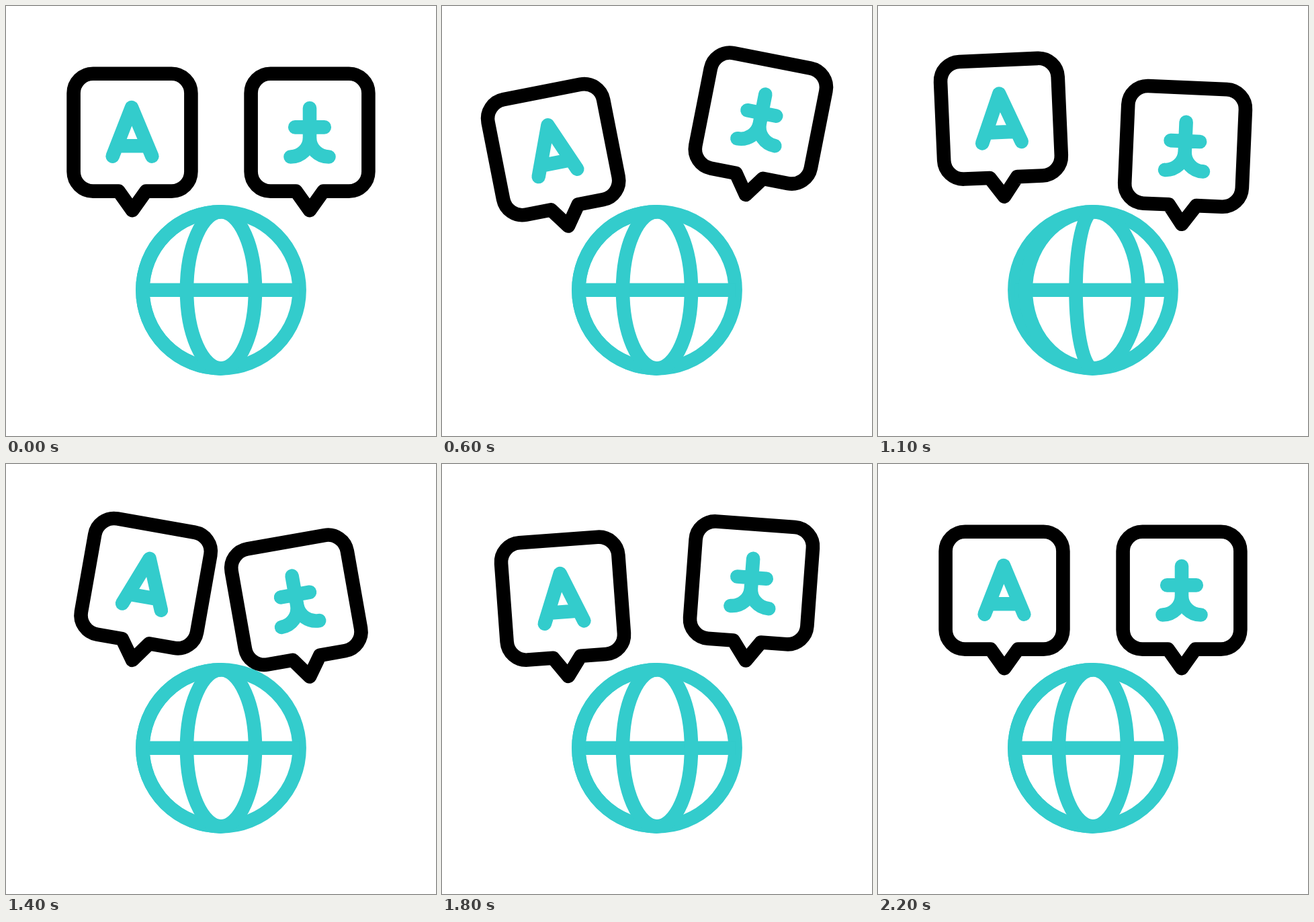
An HTML page with a canvas that plays this animation: 640 by 640 pixels, repeating every 2400 ms.

```html
<!DOCTYPE html>
<html lang="en">
<head>
<meta charset="utf-8">
<title>Translation</title>
<style>
  html, body { margin: 0; width: 100%; height: 100%; overflow: hidden; background: #fff; }
  canvas { display: block; width: 100vmin; height: 100vmin; }
</style>
</head>
<body>
<canvas id="stage" width="640" height="640"></canvas>
<script>
const ctx = document.getElementById('stage').getContext('2d');
const LOOP = 2400, STEP = 20;
const TEAL = '#33cccc', BLACK = '#000';
const LINE = 20.6;

// [time in ms, value], eased between neighbours
const LIFT = [[200, 0], [700, 26], [1200, -26], [1700, 13], [2200, 0]];
const TILT = [[200, 0], [800, -15], [1400, 10], [1800, -4.2], [2200, 0]];

const lerp = (a, b, p) => a + (b - a) * p;
const ease = p => p * p * (3 - 2 * p);

function valueAt(keys, t) {
  if (t <= keys[0][0]) return keys[0][1];
  for (let i = 1; i < keys.length; i++) {
    const [t0, a] = keys[i - 1], [t1, b] = keys[i];
    if (t < t1) return lerp(a, b, ease((t - t0) / (t1 - t0)));
  }
  return keys[keys.length - 1][1];
}

function stroke(color, build) {
  ctx.strokeStyle = color;
  ctx.beginPath();
  build();
  ctx.stroke();
}

function polyline(...pts) {
  pts.forEach(([x, y], i) => i ? ctx.lineTo(x, y) : ctx.moveTo(x, y));
}

// Bubble shapes are drawn around the tip of the tail at (0, 0).
function frame() {
  const w = 87.4, top = -203.4, bottom = -28.6, r = 29, tail = 20.5;
  ctx.moveTo(0, 0);
  ctx.lineTo(-tail, bottom);
  ctx.arcTo(-w, bottom, -w, top, r);
  ctx.arcTo(-w, top, w, top, r);
  ctx.arcTo(w, top, w, bottom, r);
  ctx.arcTo(w, bottom, 0, bottom, r);
  ctx.lineTo(tail, bottom);
  ctx.closePath();
}

function latin() {
  polyline([-29.3, -80.6], [-1, -153.2], [29.3, -80.6]);
  polyline([-22, -96], [22, -96]);
}

function ideograph() {
  const r = 28.5, y = -108.2;
  polyline([0, -152.2], [0, y]);
  polyline([-21.8, -123.8], [21.8, -123.8]);
  ctx.moveTo(-r, y + r);
  ctx.arc(-r, y, r, Math.PI / 2, 0, true);
  ctx.arc(r, y, r, Math.PI, Math.PI / 2, true);
}

function bubble(x, glyph, dir, t) {
  ctx.save();
  ctx.translate(x, 304.2 + dir * valueAt(LIFT, t));
  ctx.rotate(dir * valueAt(TILT, t) * Math.PI / 180);
  stroke(BLACK, frame);
  stroke(TEAL, glyph);
  ctx.restore();
}

function globe(t) {
  const r = 116.6, inner = 51;
  const turn = t > 200 && t < 1800 ? ((t - 200) % 400) / 400 : 0;
  const stops = [-r, -inner, inner, r];
  ctx.save();
  ctx.translate(320, 422.8);
  ctx.lineCap = 'butt';
  stroke(TEAL, () => ctx.arc(0, 0, r, 0, Math.PI * 2));
  stroke(TEAL, () => polyline([-r, 0], [r, 0]));
  for (let i = 0; i < 3; i++) {
    const x = lerp(stops[i], stops[i + 1], turn);
    stroke(TEAL, () => ctx.ellipse(0, 0, Math.abs(x), r, 0, -Math.PI / 2, Math.PI / 2, x < 0));
  }
  ctx.restore();
}

function draw(t) {
  ctx.fillStyle = '#fff';
  ctx.fillRect(0, 0, 640, 640);
  ctx.lineWidth = LINE;
  ctx.lineCap = ctx.lineJoin = 'round';
  globe(t);
  bubble(188, latin, 1, t);
  bubble(452, ideograph, -1, t);
}

const start = performance.now();
function tick() {
  const t = (performance.now() - start) % LOOP;
  draw(Math.floor(t / STEP) * STEP);
  requestAnimationFrame(tick);
}
tick();
</script>
</body>
</html>
```
